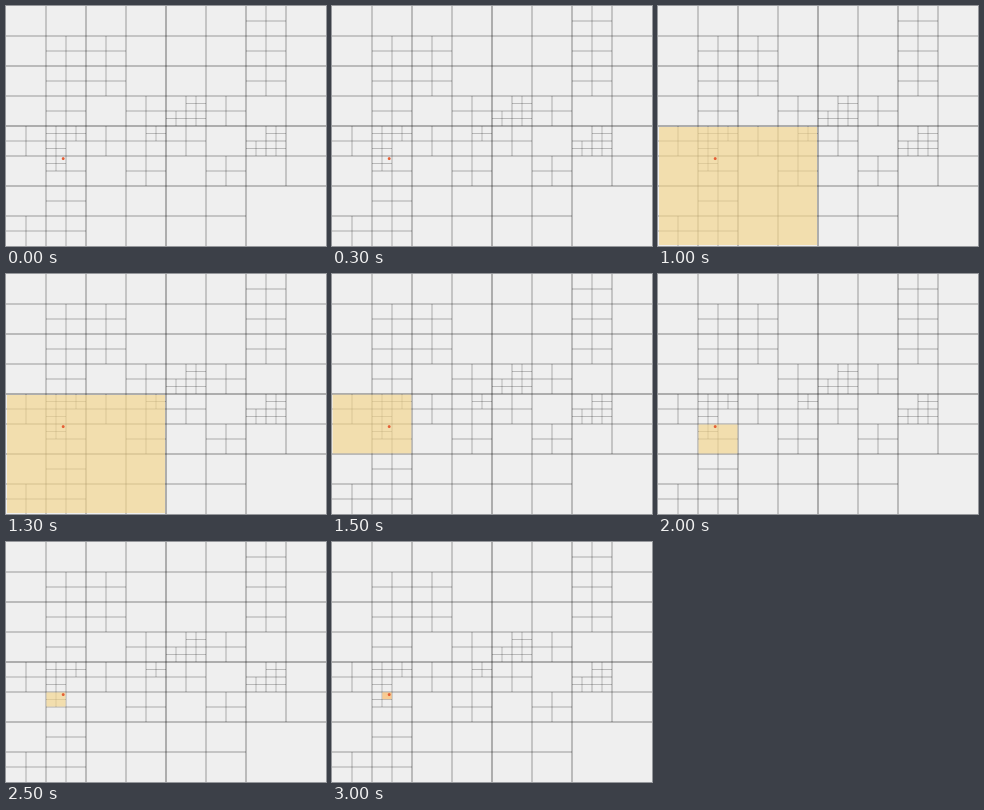
Write a matplotlib script that moves like this. It is 320 px wide and 240 px high and loops after 3500 ms.

```python
import matplotlib.pyplot as plt
from matplotlib.animation import FuncAnimation
from matplotlib.patches import Circle, Rectangle

W, H = 320, 240
DEPTH = 5
DOT = (57.2, 152.6)

# Paths through the cells that split, by grid level; corners only
PATHS = {3: [[(1, 1), (1, 7), (0, 7)],
             [(2, 1), (2, 2)],
             [(6, 0), (6, 2)],
             [(3, 5), (3, 3), (5, 3)],
             [(0, 4), (4, 4), (5, 5), (6, 4)]],
         4: [[(3, 8), (2, 8), (2, 10)],
             [(9, 6), (9, 7), (8, 7)],
             [(13, 8), (13, 9), (12, 9)],
             [(7, 8), (7, 8)]]}


def cells_on(path):
    for (x0, y0), (x1, y1) in zip(path, path[1:]):
        n = max(abs(x1 - x0), abs(y1 - y0), 1)
        for k in range(n + 1):
            yield x0 + (x1 - x0) * k // n, y0 + (y1 - y0) * k // n


SPLIT = {level: {cell for path in paths for cell in cells_on(path)}
         for level, paths in PATHS.items()}

fig = plt.figure(figsize=(W / 100, H / 100), dpi=100, facecolor="#efefef")
ax = fig.add_axes([0, 0, 1, 1])
ax.set_xlim(0, W)
ax.set_ylim(H, 0)
ax.axis("off")


def splits(level, col, row):
    if level < 2:
        return True
    if level == 2:
        return (col, row) != (3, 3)
    return (col, row) in SPLIT.get(level, ())


def bar(x, y, w, h, level):
    ax.add_patch(Rectangle((x, y), w, h, color="black", snap=False,
                           alpha=0.55 * 0.8 ** level, lw=0))


def draw_cell(level=0, col=0, row=0):
    if not splits(level, col, row):
        return
    w, h = W / 2 ** level, H / 2 ** level
    x, y = col * w, row * h
    bar(x + w / 2 - 0.5, y, 1, h, level)
    bar(x, y + h / 2 - 0.5, w, 1, level)
    for dx in (0, 1):
        for dy in (0, 1):
            draw_cell(level + 1, 2 * col + dx, 2 * row + dy)


draw_cell()
area = ax.add_patch(Rectangle((0, 0), 0, 0, lw=0, alpha=0.65, zorder=3,
                              snap=False))
ax.add_patch(Circle(DOT, 1.45, color="#e55f35", lw=0, zorder=4))


def update(i):
    # Narrow down to the cell around the dot, one level at a time
    area.set_visible(i > 0)
    level = max(i - 1, 0)
    w, h = W / 2 ** level, H / 2 ** level
    x, y = DOT[0] // w * w, DOT[1] // h * h
    inset = 2 / (level + 1)
    area.set_bounds(x + inset, y + inset, w - 2 * inset, h - 2 * inset)
    area.set_facecolor("#fdb962" if level == DEPTH else "#f4d58b")
    return area,


anim = FuncAnimation(fig, update, frames=DEPTH + 2, interval=500,
                     repeat=True, repeat_delay=0)
plt.show()
```
